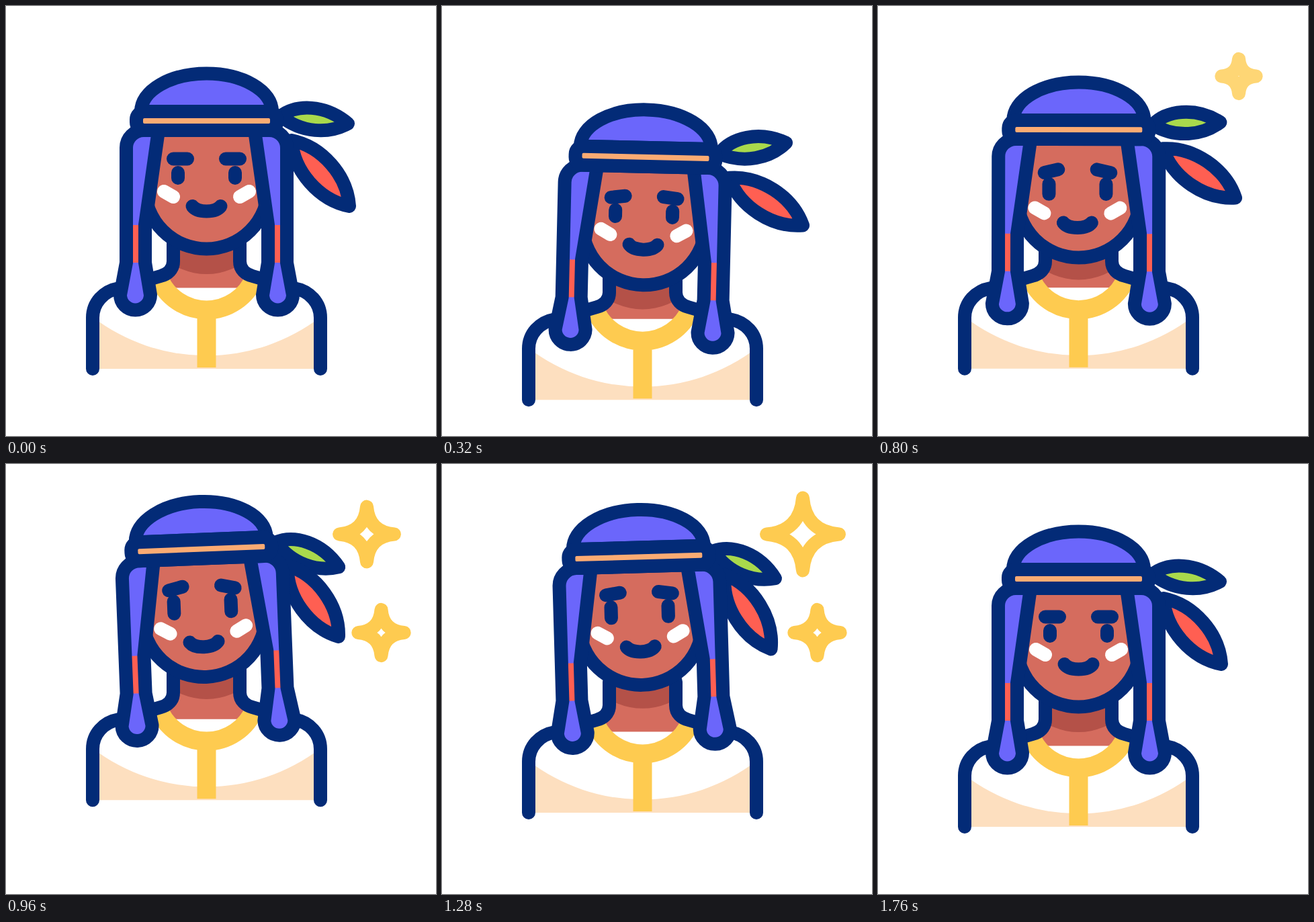
Write an HTML page that moves like this. It is 640 px wide and 640 px high and loops after 2 s.

```html
<!DOCTYPE html>
<html lang="en">
<head>
<meta charset="utf-8">
<title>Nodding character</title>
<style>
  html, body { margin: 0; width: 100%; height: 100%; overflow: hidden; background: #fff; }
  svg { display: block; width: 100%; height: 100%; }
  .line { stroke: #032b77; stroke-width: 20; stroke-linecap: round; stroke-linejoin: round; }
  .bare { fill: none; }
  .navy { fill: #032b77; }
  .hair { fill: #6b66fb; }
  .skin { fill: #d56c5e; }
  .cheek { stroke: #fff; stroke-width: 20; stroke-linecap: round; }
  .star { fill: none; stroke: #fecb50; stroke-width: 20; stroke-linejoin: round; }
</style>
</head>
<body>
<svg viewBox="0 0 640 640">
  <defs>
    <clipPath id="neckClip"><rect x="240" y="330" width="117" height="89.5"/></clipPath>
    <path id="lock" d="M227 185L207 326V382L215 430A22.5 22.5 0 1 1 170 430L179 382V211A26 26 0 0 1 205 185Z"/>
    <g id="braid">
      <use href="#lock" class="hair"/>
      <rect x="184" y="326" width="18" height="56" fill="#ff5f52"/>
      <use href="#lock" class="line bare"/>
    </g>
  </defs>

  <g id="body">
    <path d="M129 463A279 279 0 0 0 468 463V540H129Z" fill="#fddfbf"/>
    <g clip-path="url(#neckClip)">
      <rect class="skin" x="240" y="330" width="117" height="90"/>
      <circle id="shade" cx="298.5" cy="302" r="97" fill="#b45148"/>
    </g>
    <path d="M227 404A77 77 0 0 0 370 404M298.5 452V538" fill="none" stroke="#fecb50" stroke-width="28"/>
    <path id="shoulder" class="line bare" d="M129 540V464C129 442 145 424 168 420L230 402C241 399 249 392 249 380V345"/>
    <use href="#shoulder" transform="translate(597) scale(-1 1)"/>
  </g>

  <g id="head">
    <path id="upperFeather" class="line" fill="#a9d94c" d="M409 164C432 146 475 146 509 175C480 191 440 189 409 164Z"/>
    <path id="lowerFeather" class="line" fill="#ff5f52" d="M425 200C470 209 508 252 511 298C466 289 428 246 425 200Z"/>
    <path class="line skin" d="M206.5 185V269.5A92 92 0 0 0 390.5 269.5V185Z"/>
    <use href="#braid"/>
    <use href="#braid" transform="translate(597) scale(-1 1)"/>
    <path class="line hair" d="M201 157A97.5 56.5 0 0 1 396 157Z"/>
    <rect class="line" x="194" y="157" width="209" height="28" rx="12" fill="#fcab73"/>
    <g id="face">
      <path class="line bare" d="M277.5 298C285 308 312 308 319.5 298"/>
      <g id="side">
        <path class="cheek" d="M235 276L249 284"/>
        <rect id="eye" class="navy" x="246" width="20" rx="10"/>
        <path id="brow" class="line" d="M249 227.5H270"/>
      </g>
      <use href="#side" transform="translate(597) scale(-1 1)"/>
    </g>
  </g>

  <path id="bigStar" class="star"/>
  <path id="smallStar" class="star"/>
</svg>
<script>
  const LOOP = 2000, STEP = 40;
  const el = id => document.getElementById(id);
  const set = (id, attrs) => {
    for (const name in attrs) el(id).setAttribute(name, attrs[name]);
  };
  const clamp = x => Math.min(1, Math.max(0, x));
  const smooth = p => p * p * (3 - 2 * p);
  const easeOut = power => p => 1 - (1 - p) ** power;

  // Eases from key to key and holds the end values outside the range.
  function track(t, times, values) {
    if (t <= times[0]) return values[0];
    const i = times.findIndex(time => time > t);
    if (i < 0) return values[values.length - 1];
    const p = (t - times[i - 1]) / (times[i] - times[i - 1]);
    return values[i - 1] + (values[i] - values[i - 1]) * smooth(p);
  }

  function star(id, t, x, y, size, [start, peak, end], ease) {
    const p = t < peak ? (t - start) / (peak - start) : (end - t) / (end - peak);
    const s = size * ease(clamp(p));
    const k = s * 0.08;
    set(id, {
      d: `M0 ${-s}Q${k} ${-k} ${s} 0Q${k} ${k} 0 ${s}Q${-k} ${k} ${-s} 0Q${-k} ${-k} 0 ${-s}Z`,
      transform: `translate(${x} ${y})`,
      opacity: clamp(p / 0.35)
    });
  }

  function draw(t) {
    const bodyY = track(t, [0, 520, 1000, 1560], [0, 69, -42, 0]);
    const nod = track(t, [120, 640, 1120, 1680], [0, 23, -14.5, 0]);
    const tilt = track(t, [120, 560, 1020, 1680], [0, 3.05, -2.5, 0]);
    const upper = track(t, [100, 560, 1080, 1680], [0, -36, 26, 0]);
    const lower = track(t, [110, 560, 1080, 1680], [0, -38.2, 15, 0]);
    const faceY = track(t, [120, 680, 880, 1760], [0, 11.5, 11.5, 0]);
    const lift = track(t, [480, 1080, 1760], [0, -11.5, 0]);
    const frown = track(t, [0, 600, 960, 1760], [0, -13, -13, 0]);
    const eyeHeight = 28 - lift * 0.7 - frown * 0.2;
    const eyeBottom = 266 + lift * 0.3 - frown * 0.1;

    set('body', { transform: `translate(0 ${bodyY})` });
    set('shade', { transform: `translate(0 ${nod - faceY * 0.4})` });
    set('head', { transform: `translate(0 ${bodyY + nod}) rotate(${tilt} 298.5 368)` });
    set('upperFeather', { transform: `rotate(${upper} 406 167)` });
    set('lowerFeather', { transform: `rotate(${lower} 421 204)` });
    set('face', { transform: `translate(${-faceY * 0.15} ${faceY})` });
    set('eye', { y: eyeBottom - eyeHeight, height: eyeHeight });
    set('brow', { transform: `translate(0 ${lift}) rotate(${frown} 259.5 227.5)` });

    star('bigStar', t, 537, 104.5, 54, [610, 1300, 1660], easeOut(2));
    star('smallStar', t, 558.5, 251, 39, [800, 1120, 1440], easeOut(3));
  }

  const origin = performance.now();
  function tick() {
    const t = (performance.now() - origin) % LOOP;
    draw(Math.floor(t / STEP) * STEP);
    requestAnimationFrame(tick);
  }
  draw(0);
  requestAnimationFrame(tick);
</script>
</body>
</html>
```
